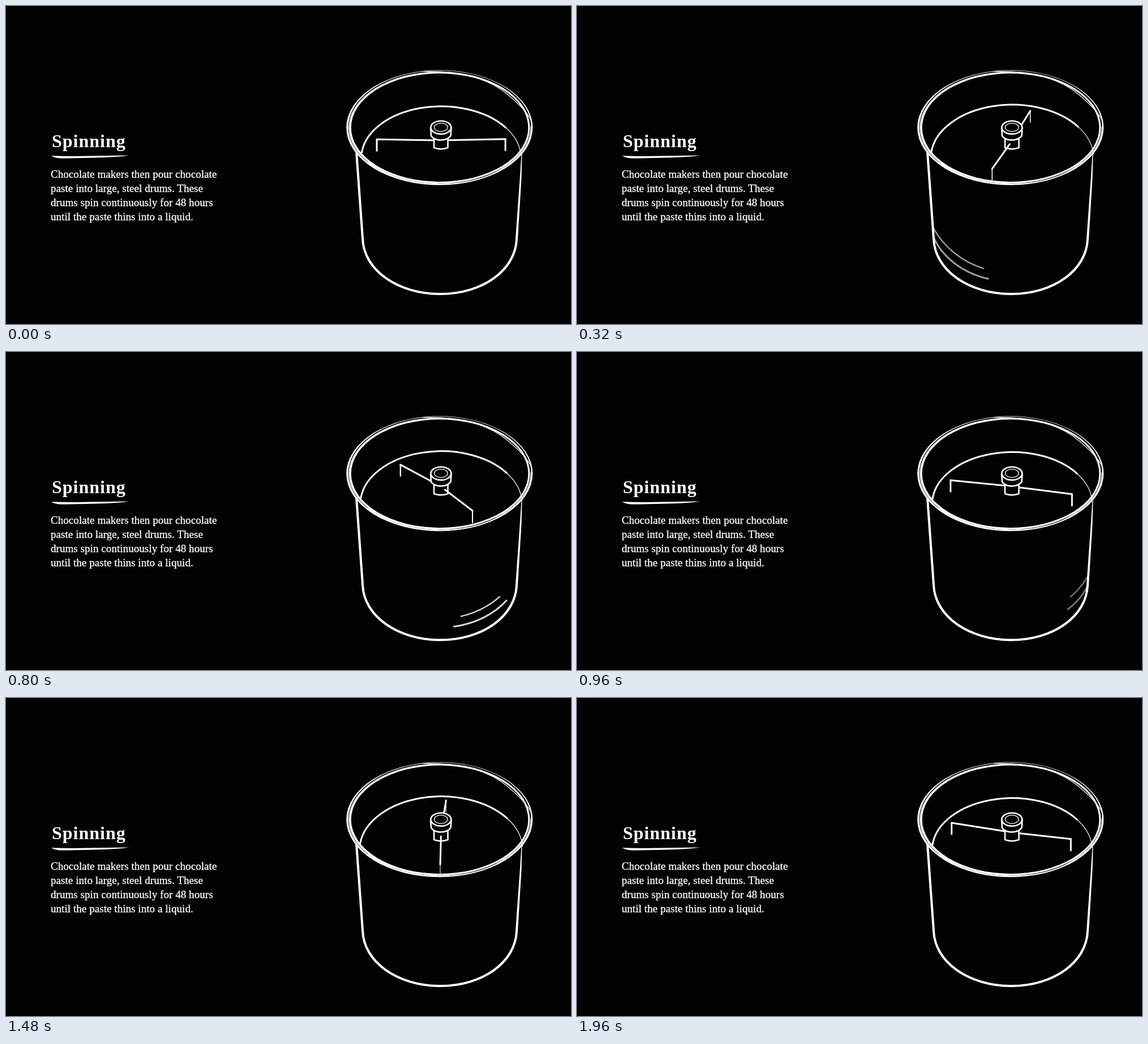
Animation of 998 by 561 pixels, one loop 2 s. Source, as an HTML page:

```html
<!DOCTYPE html>
<html lang="en">
<head>
<meta charset="utf-8">
<title>Spinning</title>
<style>
  html, body { margin: 0; width: 100%; height: 100%; overflow: hidden; background: #020202; }
  svg { display: block; width: 998px; height: 561px; }
  text { font-family: "Liberation Serif", "Times New Roman", serif; fill: #fff; stroke: #fff; }
  .title { font-size: 32px; font-weight: bold; letter-spacing: 1px; stroke-width: 0; }
  .copy { font-size: 19px; letter-spacing: .06px; stroke-width: .35px; }
  .ink { fill: #fff; fill-rule: evenodd; }
  .line { fill: none; stroke: #fff; stroke-width: 3; stroke-linecap: round; stroke-linejoin: round; }
  .wall { stroke-width: 4; }
  .hub { stroke-width: 2.6; }
  .hub .solid { fill: #020202; }
  .thin { stroke-width: 1.2; }
  #swoosh { stroke-linecap: butt; }
  #inner { stroke-width: 2.4; }
</style>
</head>
<body>
<svg viewBox="0 0 998 561">
  <clipPath id="drum">
    <path d="M619 258L630 411C632 466 692 508 767 508S900 466 902 411L911 262Z"/>
  </clipPath>

  <text class="title" x="81" y="249">Spinning</text>
  <path class="ink" d="M80 264.2Q112 265.4 150 264.6T217 263.4Q200 266.6 160 267.4T100 268.8Q86 268.6 80 264.2Z"/>
  <g class="copy">
    <text x="79" y="303">Chocolate makers then pour chocolate</text>
    <text x="79" y="328">paste into large, steel drums. These</text>
    <text x="79" y="353">drums spin continuously for 48 hours</text>
    <text x="79" y="378">until the paste thins into a liquid.</text>
  </g>

  <g id="swoosh" class="line" clip-path="url(#drum)">
    <path id="outer"/>
    <path id="inner"/>
  </g>

  <path class="line wall" d="M619 258L630 411C632 466 692 508 767 508S900 466 902 411"/>
  <path class="ink" d="M910.4 262H911.6L910.4 305L904 411H900L907.6 305Z"/>

  <path id="surface" class="line"/>
  <path id="edge" class="line thin"/>

  <g id="back" class="line"></g>

  <g class="line hub">
    <path class="solid" d="M756 230V250Q768 254.5 780.5 250V230Z"/>
    <path class="solid" d="M750 215L751 229Q756 236.5 768 236.5T785.5 229L786.5 215Z"/>
    <ellipse class="solid" cx="768.3" cy="214.3" rx="18" ry="11.6"/>
    <ellipse class="thin" cx="768.3" cy="214" rx="11.8" ry="7.4"/>
  </g>

  <g id="front" class="line"></g>

  <!-- rim -->
  <path class="ink" id="rimIn"/>
  <path class="ink" id="rimOut"/>
  <g class="line thin">
    <path d="M735 115.5Q835 113 886 156T927 214Q927 250 888 279"/>
    <path d="M640 276Q690 314 768 314T888 278"/>
  </g>
</svg>
<script>
  const $ = id => document.getElementById(id);
  const LOOP = 2000, TAU = 2 * Math.PI, RAD = Math.PI / 180;
  const CX = 768.5, CY = 236, RX = 113.5, RY = 52;

  const ring = (x, y, rx, ry) =>
    `M${x - rx} ${y}a${rx} ${ry} 0 1 0 ${2 * rx} 0a${rx} ${ry} 0 1 0 ${-2 * rx} 0Z`;
  $('rimIn').setAttribute('d', ring(765.5, 214.5, 160, 98.7) + ring(766, 214.5, 156.4, 95.4));
  $('rimOut').setAttribute('d', ring(765.7, 214.5, 164.6, 101.4) + ring(766.2, 213.9, 161.6, 100.2));

  // time, then the two tips of the stirring bar
  const poses = [
    [0, 655, 235, 882, 235],
    [320, 733, 287, 801, 185],
    [640, 789, 289, 745, 186],
    [960, 874, 251, 660, 226],
    [1000, 882, 235, 655, 235],
    [1240, 828, 187, 717, 287],
    [1720, 732, 186, 809, 288],
    [1960, 662, 220, 872, 249]
  ];

  function polarKeys(col) {
    let last = Infinity;
    return poses.map(p => {
      const x = (p[col] - CX) / RX, y = (p[col + 1] - CY) / RY;
      let a = Math.atan2(y, x);
      while (a > last) a -= TAU;
      last = a;
      return [p[0], a, Math.hypot(x, y)];
    });
  }

  function keyAt(keys, i) {
    const n = keys.length, turn = Math.floor(i / n), k = keys[i - turn * n];
    return [k[0] + turn * LOOP, k[1] - turn * TAU, k[2]];
  }

  // smooth cubic through unevenly spaced keys
  function spline(keys, t) {
    let i = keys.length - 1;
    while (keys[i][0] > t) i--;
    const [k0, k1, k2, k3] = [-1, 0, 1, 2].map(d => keyAt(keys, i + d));
    const slope = (a, b, c, j) => {
      const h0 = b[0] - a[0], h1 = c[0] - b[0];
      return ((b[j] - a[j]) / h0 * h1 + (c[j] - b[j]) / h1 * h0) / (h0 + h1);
    };
    const h = k2[0] - k1[0], u = (t - k1[0]) / h, v = 1 - u;
    return [1, 2].map(j =>
      v * v * (1 + 2 * u) * k1[j] + u * u * (3 - 2 * u) * k2[j] +
      h * u * v * (v * slope(k0, k1, k2, j) - u * slope(k1, k2, k3, j)));
  }

  function ramp(keys, t) {
    const i = keys.findIndex(k => k[0] >= t);
    if (i < 0) return keys[keys.length - 1][1];
    if (i === 0) return keys[0][1];
    const [a, b] = [keys[i - 1], keys[i]];
    return a[1] + (b[1] - a[1]) * (t - a[0]) / (b[0] - a[0]);
  }

  // elliptical arc between two angles, in degrees clockwise from the right
  function arc(cx, cy, rx, ry, from, to, sweep) {
    const at = a => `${cx + rx * Math.cos(a * RAD)} ${cy + ry * Math.sin(a * RAD)}`;
    return `M${at(from)}A${rx} ${ry} 0 0 ${sweep} ${at(to)}`;
  }

  function newPath(parent) {
    const p = document.createElementNS('http://www.w3.org/2000/svg', 'path');
    return $(parent).appendChild(p);
  }
  const arms = [1, 3].map(col => ({
    keys: polarKeys(col),
    back: [newPath('back'), newPath('back')],
    front: [newPath('front'), newPath('front')]
  }));

  function drawArm(arm, t) {
    const [a, r] = spline(arm.keys, t);
    const c = Math.cos(a), s = Math.sin(a);
    const x = CX + RX * r * c, y = CY + RY * r * s;
    const near = s > .12;
    const root = near ? `${CX + 14 * c} ${237 + 7 * s}` : '768 237';
    const [bar, leg] = near ? arm.front : arm.back;
    for (const p of [...arm.back, ...arm.front]) p.setAttribute('d', '');
    bar.setAttribute('d', `M${root}L${x} ${y}`);
    leg.setAttribute('d', `M${x} ${y}v${20 + 1.5 * Math.max(0, s)}`);
    leg.style.strokeWidth = 1 + 2 * Math.abs(c);
  }

  const head = [[120, 176], [320, 106], [640, 61.5], [960, 10]];
  const tail = [[120, 178], [320, 170], [640, 115], [960, 47], [1160, 15]];
  const fade = [[120, 0], [320, .62], [440, 1], [740, 1], [960, .45], [1150, 0]];

  function drawSwoosh(t) {
    const h = ramp(head, t), e = ramp(tail, t);
    $('swoosh').style.opacity = ramp(fade, t);
    $('outer').setAttribute('d', arc(767, 370, 145, 116, e, h, 0));
    $('inner').setAttribute('d', arc(767, 324.5, 155, 146, .85 * e + 8, .87 * h + 16, 0));
  }

  function drawSurface(t) {
    const s = Math.sin(Math.PI * (t % 1000) / 1000);
    const box = [768.7, 268, 141 + 3.2 * s, 91 + 3.5 * s];
    $('surface').setAttribute('d', arc(...box, 186, 324, 1));
    $('edge').setAttribute('d', arc(...box, 322, 356, 1));
  }

  const start = performance.now();
  function frame() {
    const t = (performance.now() - start) % LOOP;
    arms.forEach(arm => drawArm(arm, t));
    drawSwoosh(t);
    drawSurface(t);
    requestAnimationFrame(frame);
  }
  frame();
</script>
</body>
</html>
```
